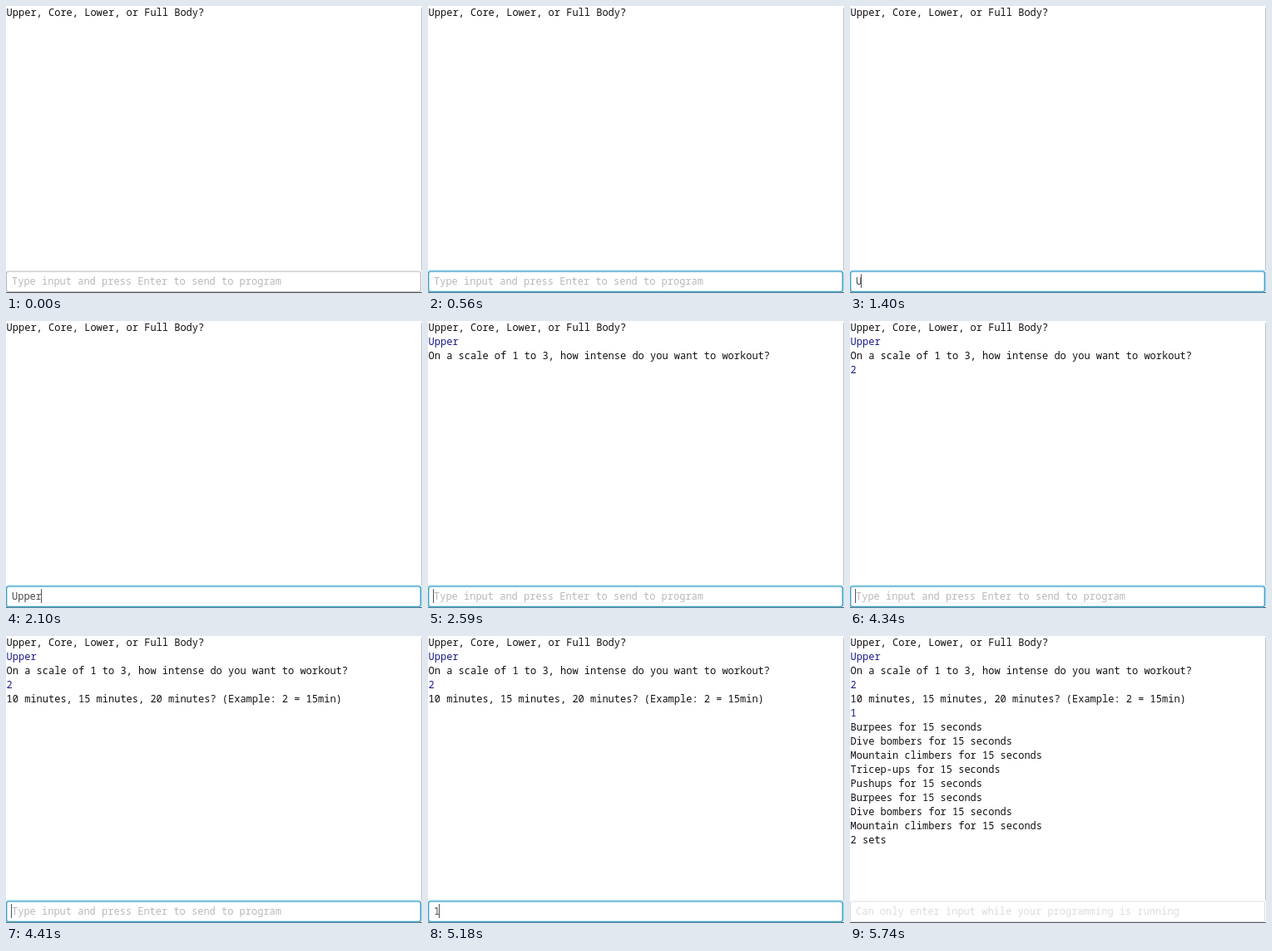
An HTML page with a canvas that plays this animation: 500 px wide and 346 px high, repeating every 7.14 s.

```html
<!DOCTYPE html>
<html lang="en">
<head>
<meta charset="utf-8">
<title>Workout console</title>
<style>
  html, body { margin: 0; width: 100%; height: 100%; overflow: hidden; background: #fff; }
  canvas { display: block; width: 500px; height: 346px; }
</style>
</head>
<body>
<canvas id="stage" width="500" height="346"></canvas>
<script>
const ctx = document.getElementById('stage').getContext('2d');
const LOOP = 7140;
const CHAR = 7.2;
const FONT = '12px "Roboto Mono", "Noto Sans Mono", "DejaVu Sans Mono", monospace';
const INK = '#111', ECHO = '#1b1b86', TYPED = '#484848';
const HINT = 'Type input and press Enter to send to program';
const DONE_HINT = 'Can only enter input while your programming is running';
const FOCUS = 560, FINISH = 5740;

// Console output: [time, text, colour]
const log = [
  [0, 'Upper, Core, Lower, or Full Body?', INK],
  [2590, 'Upper', ECHO],
  [2590, 'On a scale of 1 to 3, how intense do you want to workout?', INK],
  [4340, '2', ECHO],
  [4410, '10 minutes, 15 minutes, 20 minutes? (Example: 2 = 15min)', INK],
  [FINISH, '1', ECHO],
  ...['Burpees', 'Dive bombers', 'Mountain climbers', 'Tricep-ups',
      'Pushups', 'Burpees', 'Dive bombers', 'Mountain climbers']
    .map(name => [FINISH, name + ' for 15 seconds', INK]),
  [FINISH, '2 sets', INK]
];

// Input field: [time, value, caret visible]
const field = [
  [0, '', false],
  [630, '', true],
  [1190, '', false],
  [1400, 'U', true],
  [1680, 'Up', true],
  [1820, 'Upp', true],
  [1960, 'Uppe', true],
  [2100, 'Upper', true],
  [2590, '', true],
  [3080, '', false],
  [3570, '', true],
  [3850, '2', true],
  [4340, '', true],
  [4900, '', false],
  [5180, '1', true],
  [FINISH, '', false]
];

function text(str, x, y, color) {
  ctx.fillStyle = color;
  ctx.fillText(str, x, y);
}

function rect(x, y, w, h, color) {
  ctx.fillStyle = color;
  ctx.fillRect(x, y, w, h);
}

function outline(x, y, w, h, r, color, width) {
  ctx.beginPath();
  ctx.roundRect(x, y, w, h, r);
  ctx.strokeStyle = color;
  ctx.lineWidth = width;
  ctx.stroke();
}

function drawBox(t) {
  const focused = t >= FOCUS && t < FINISH;
  const border = focused ? '#459fc2' : t < FOCUS ? '#b9b9b9' : '#dedede';
  rect(0, 345, 500, 1, '#55595c');
  if (focused) outline(0.5, 319.5, 498, 25, 3, 'rgba(110,195,230,0.45)', 3);
  outline(0.5, 320, 498, 24.5, 2.5, border, 1.2);
}

function draw(t) {
  rect(0, 0, 500, 346, '#fff');
  rect(499, 2, 1, 317, '#c4c4c4');
  ctx.font = FONT;
  ctx.textBaseline = 'alphabetic';

  log.forEach(([at, str, color], i) => {
    if (t >= at) text(str, 0.6, 12 + 17 * i, color);
  });

  drawBox(t);
  const [, value, caret] = field.filter(s => t >= s[0]).pop();
  if (value) text(value, 7, 336, TYPED);
  else if (t < FINISH) text(HINT, 7, 336, '#b8b8b8');
  else text(DONE_HINT, 7, 336, '#dcdcdc');
  if (caret) rect(Math.floor(6.5 + value.length * CHAR), 323, 1, 17, '#555');
}

const start = performance.now();
function tick() {
  draw((performance.now() - start) % LOOP);
  requestAnimationFrame(tick);
}
tick();
</script>
</body>
</html>
```
